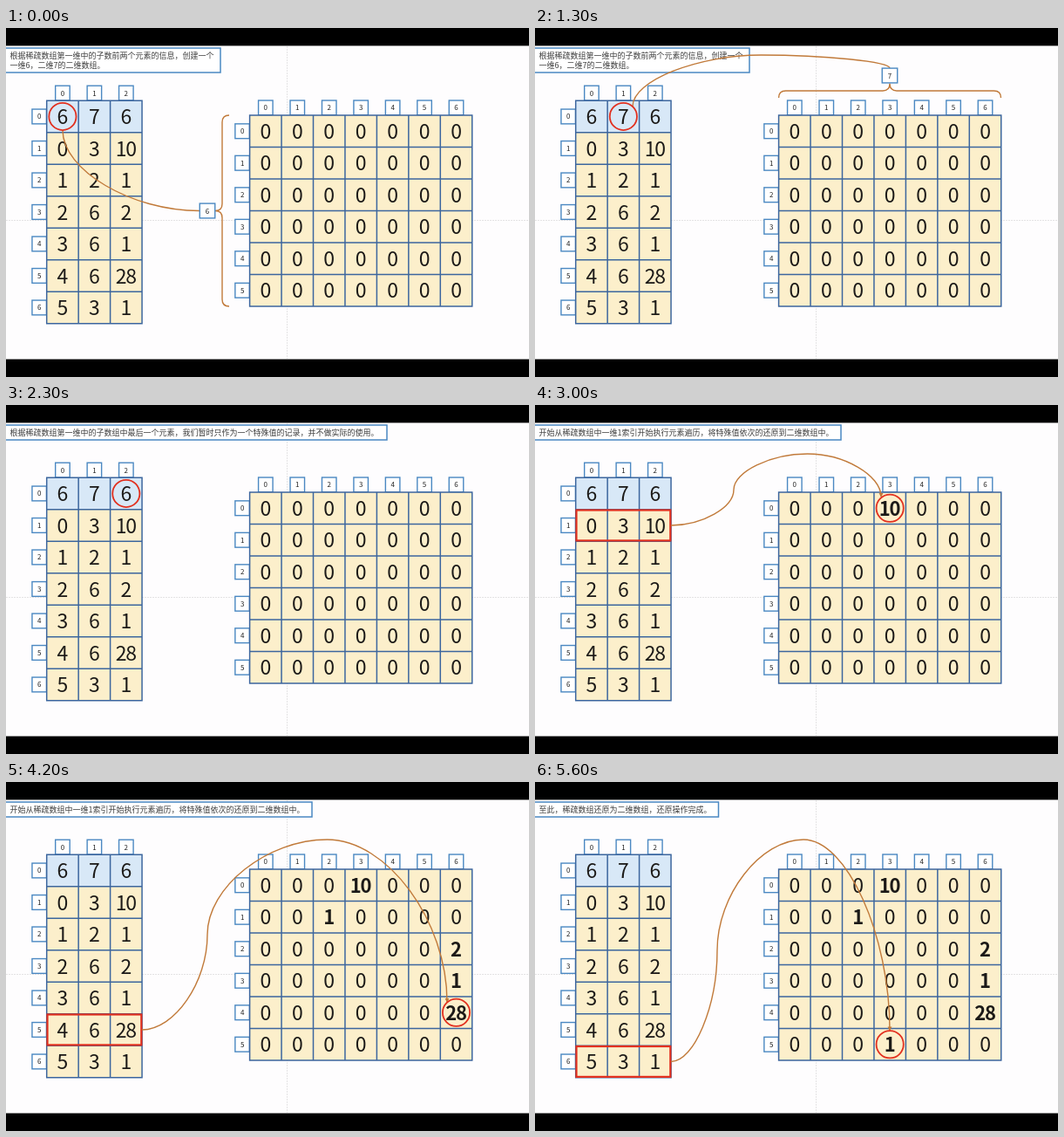
These frames come from a looping animation (600x400 px, 5700 ms). An HTML page with a canvas:

```html
<!DOCTYPE html>
<html lang="zh">
<head>
<meta charset="utf-8">
<style>
html, body { margin: 0; width: 600px; height: 400px; overflow: hidden; background: #000; }
canvas { display: block; }
</style>
</head>
<body>
<canvas id="stage" width="600" height="400"></canvas>
<script>
const ctx = document.getElementById('stage').getContext('2d');
const LOOP = 5700;
const CELL = 36.45, ROW = 36.5;
const BLUE = '#4a88c2', GRID = '#3c669e', RED = '#e2301f', ORANGE = '#c17a3a', PAPER = '#fefdfe';
const CJK = '"Noto Sans CJK SC", "Noto Sans CJK", sans-serif';

const sparse = [[6, 7, 6], [0, 3, 10], [1, 2, 1], [2, 6, 2], [3, 6, 1], [4, 6, 28], [5, 3, 1]];
const left = { x: 46.7, y: 83.2, cols: 3, rows: 7 };
const right = { x: 279.6, y: 100, cols: 7, rows: 6 };

const notes = [
  { at: 0, w: 246, lines: ['根据稀疏数组第一维中的子数前两个元素的信息，创建一个', '一维6，二维7的二维数组。'] },
  { at: 1700, w: 437, lines: ['根据稀疏数组第一维中的子数组中最后一个元素，我们暂时只作为一个特殊值的记录，并不做实际的使用。'] },
  { at: 2500, w: 351, lines: ['开始从稀疏数组中一维1索引开始执行元素遍历，将特殊值依次的还原到二维数组中。'] },
  { at: 5300, w: 210.5, lines: ['至此，稀疏数组还原为二维数组，还原操作完成。'] }
];

// bend: x of the first turn, peak: y of the top, end: arrow tip
const steps = [
  { at: 0, col: 0 },
  { at: 800, col: 1 },
  { at: 1700, col: 2 },
  { at: 2500, row: 1, bend: 228, peak: 56, end: [397, 105] },
  { at: 3300, row: 2, bend: 229, peak: 62, end: [360.5, 143] },
  { at: 3700, row: 3, bend: 232, peak: 62, end: [506, 179] },
  { at: 4000, row: 4, bend: 232, peak: 64, end: [506, 215.5] },
  { at: 4200, row: 5, bend: 231, peak: 66, end: [506, 252] },
  { at: 4400, row: 6, bend: 209, peak: 66, end: [407, 284.5] }
];

const current = (list, t) => list.filter(s => s.at <= t).pop();
const center = (tab, r, c) => [tab.x + (c + 0.5) * CELL, tab.y + (r + 0.5) * ROW];
const mid = (a, b) => (a + b) / 2;

function label(text, x, y, font, color, drop) {
  ctx.font = font;
  ctx.fillStyle = color;
  ctx.textAlign = 'center';
  ctx.fillText(text, x, y + drop);
}

function digit(value, x, y, bold) {
  const s = String(value), gap = s.length > 1 ? -1.2 : 0;
  ctx.letterSpacing = gap + 'px';
  label(s, x + gap / 2, y, (bold ? 'bold 22px ' : '400 23px ') + CJK, '#1c1a18', 8.6);
  ctx.letterSpacing = '0px';
}

function tag(text, x, y, w = 16.5) {
  ctx.fillStyle = '#fff';
  ctx.fillRect(x - w / 2, y - 8.4, w, 16.8);
  ctx.strokeStyle = BLUE;
  ctx.lineWidth = 1.4;
  ctx.strokeRect(x - w / 2, y - 8.4, w, 16.8);
  label(text, x, y, '8px ' + CJK, '#222', 3);
}

function table(tab, valueAt, headRow) {
  const { x, y, cols, rows } = tab, w = cols * CELL, h = rows * ROW;
  for (let c = 0; c < cols; c++) tag(c, x + (c + 0.5) * CELL, y - 8.6);
  for (let r = 0; r < rows; r++) tag(r, x - 8.5, y + (r + 0.5) * ROW);
  ctx.fillStyle = '#fcefcb';
  ctx.fillRect(x, y, w, h);
  if (headRow) {
    ctx.fillStyle = '#d8e8f7';
    ctx.fillRect(x, y, w, ROW);
  }
  ctx.beginPath();
  for (let c = 0; c <= cols; c++) { ctx.moveTo(x + c * CELL, y); ctx.lineTo(x + c * CELL, y + h); }
  for (let r = 0; r <= rows; r++) { ctx.moveTo(x, y + r * ROW); ctx.lineTo(x + w, y + r * ROW); }
  ctx.strokeStyle = GRID;
  ctx.lineWidth = 1.5;
  ctx.lineCap = 'square';
  ctx.stroke();
  for (let r = 0; r < rows; r++)
    for (let c = 0; c < cols; c++) {
      const [value, bold] = valueAt(r, c);
      digit(value, ...center(tab, r, c), bold);
    }
}

function line(d) {
  ctx.strokeStyle = ORANGE;
  ctx.lineWidth = 1.4;
  ctx.lineCap = 'butt';
  ctx.stroke(new Path2D(d));
}

function ring(x, y) {
  ctx.beginPath();
  ctx.arc(x, y, 15.6, 0, Math.PI * 2);
  ctx.strokeStyle = RED;
  ctx.lineWidth = 1.8;
  ctx.stroke();
}

// Curved connector: out sideways, up over the peak, straight down into the end.
function arrow({ row, bend, peak, end: [ex, ey] }) {
  const x = 156, y = left.y + (row + 0.5) * ROW;
  const turn = mid(y, peak), top = mid(bend, ex);
  line(`M${x} ${y} C${mid(x, bend)} ${y} ${bend} ${mid(y, turn)} ${bend} ${turn}
    C${bend} ${mid(turn, peak)} ${mid(bend, top)} ${peak} ${top} ${peak}
    C${mid(top, ex)} ${peak} ${ex} ${mid(peak, ey)} ${ex} ${ey}`);
  ctx.fillStyle = ORANGE;
  ctx.fill(new Path2D(`M${ex} ${ey + 1} l-2.4 -5 h4.8 Z`));
}

function background() {
  ctx.fillStyle = '#000';
  ctx.fillRect(0, 0, 600, 400);
  ctx.fillStyle = PAPER;
  ctx.fillRect(0, 20.4, 600, 359.2);
  ctx.strokeStyle = '#e4e3e4';
  ctx.lineWidth = 1;
  ctx.lineCap = 'butt';
  ctx.setLineDash([2, 1]);
  ctx.stroke(new Path2D('M0 220.5 H600 M322.5 21 V379'));
  ctx.setLineDash([]);
}

function note({ w, lines }) {
  const h = lines.length > 1 ? 28 : 17;
  ctx.fillStyle = '#fff';
  ctx.fillRect(-1, 23, w + 1, h);
  ctx.strokeStyle = BLUE;
  ctx.lineWidth = 1.5;
  ctx.strokeRect(-1, 23, w + 1, h);
  ctx.font = '300 9px ' + CJK;
  ctx.fillStyle = '#3c3c3c';
  ctx.textAlign = 'left';
  lines.forEach((s, i) => ctx.fillText(s, 4.5, 34.7 + i * 11.2));
}

function draw(t) {
  const step = current(steps, t), done = step.row || 0;
  background();
  note(current(notes, t));
  table(left, (r, c) => [sparse[r][c], false], true);
  table(right, (r, c) => {
    const hit = sparse.slice(1, done + 1).find(s => s[0] === r && s[1] === c);
    return hit ? [hit[2], true] : [0, false];
  });

  if (done) {
    ctx.strokeStyle = RED;
    ctx.lineWidth = 2.2;
    ctx.strokeRect(47.5, left.y + done * ROW + 0.8, 107.8, ROW - 1.6);
    arrow(step);
    ring(...center(right, sparse[done][0], sparse[done][1]));
    return;
  }
  if (step.col === 0) {
    line('M65 117 C65 163 143.5 209.5 222 209.5');
    line('M256 100 Q248 100 248 108 V201.5 Q248 209.5 240 209.5 Q248 209.5 248 217.5 V311 Q248 319 256 319');
    tag(6, 231, 209.5, 17.5);
  }
  if (step.col === 1) {
    line('M112 90 C112 60.5 186 31 259.5 31 C333 31 407 38.5 407 46');
    line('M279.6 80 Q279.6 72 287.6 72 H399 Q407 72 407 63.5 Q407 72 415 72 H526.5 Q534.5 72 534.5 80');
    tag(7, 407, 54.5, 17.5);
  }
  ring(...center(left, 0, step.col));
}

const start = performance.now();
function tick() {
  draw((performance.now() - start) % LOOP);
  requestAnimationFrame(tick);
}
tick();
</script>
</body>
</html>
```
